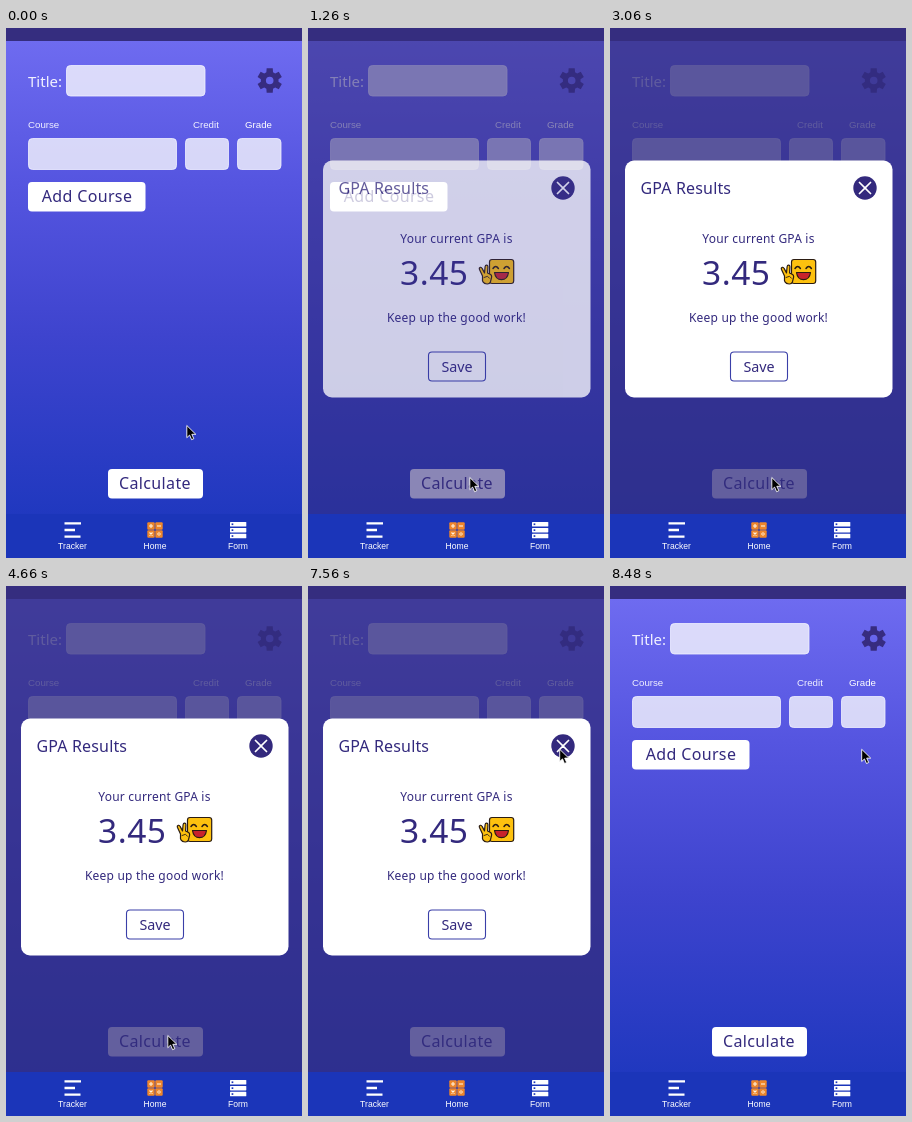
Write an HTML page that moves like this. It is 296x530 px and loops after 8.5 s.

```html
<!DOCTYPE html>
<html lang="en">
<head>
<meta charset="utf-8">
<title>GPA calculator</title>
<style>
  html, body { margin: 0; width: 100%; height: 100%; overflow: hidden; background: #1c35ba; }
  svg { display: block; width: 296px; height: 530px; }
  text { font-family: "Noto Sans", "Open Sans", sans-serif; fill: #33297d; }
  .mid { text-anchor: middle; }
  .light { fill: #f1f1ff; }
  .label { font: 9.7px "Liberation Sans", Arial, sans-serif; }
  .tab { font: 8.6px "Liberation Sans", Arial, sans-serif; text-anchor: middle; fill: #fff; }
  .field { fill: #fff; fill-opacity: .76; stroke: #f0f0ff; stroke-opacity: .8; }
  .button { font-size: 16px; letter-spacing: .35px; }
  .note { font-size: 12px; letter-spacing: .2px; text-anchor: middle; }
</style>
</head>
<body>
<svg viewBox="0 0 296 530" xmlns="http://www.w3.org/2000/svg">
  <defs>
    <linearGradient id="sky" x1="0" y1="0" x2="0" y2="1">
      <stop offset="0" stop-color="#6e6bf0"/>
      <stop offset=".3" stop-color="#5555e0"/>
      <stop offset=".62" stop-color="#3e44ce"/>
      <stop offset="1" stop-color="#2038bf"/>
    </linearGradient>
  </defs>

  <rect y="13" width="296" height="474" fill="url(#sky)"/>

  <g id="form">
    <text x="22" y="59" font-size="15" class="light">Title:</text>
    <rect class="field" x="60.5" y="37.5" width="138.5" height="30.5" rx="4"/>
    <path id="gear" fill="#372c80" fill-rule="evenodd"/>
    <text x="22" y="99.5" class="label light">Course</text>
    <text x="187" y="99.5" class="label light">Credit</text>
    <text x="239" y="99.5" class="label" style="fill:#fff">Grade</text>
    <rect class="field" x="22.5" y="110.5" width="148" height="31" rx="4"/>
    <rect class="field" x="179.5" y="110.5" width="43" height="31" rx="4"/>
    <rect class="field" x="231.5" y="110.5" width="43.5" height="31" rx="4"/>
    <rect x="102" y="441" width="95" height="29.5" rx="4" fill="#fff"/>
    <text x="149" y="461" class="button mid">Calculate</text>
  </g>

  <rect id="shade" y="13" width="296" height="474" fill="#332d80"/>

  <rect x="22" y="154" width="117.5" height="29.5" rx="4" fill="#fff"/>
  <text x="81" y="174" class="button mid">Add Course</text>

  <g id="dialog">
    <rect x="15" y="132.5" width="267.5" height="237" rx="9" fill="#fff"/>
    <text x="30.5" y="166" font-size="16" letter-spacing=".15">GPA Results</text>
    <circle cx="255" cy="160" r="11.7" fill="#33297d"/>
    <path d="M249.5 154.5l11 11m0-11l-11 11" stroke="#fff" stroke-width="1.7" stroke-linecap="round"/>
    <text x="148.5" y="215" class="note">Your current GPA is</text>
    <text x="92" y="256.5" font-size="33.5" letter-spacing=".5">3.45</text>
    <text x="148.5" y="294" class="note">Keep up the good work!</text>
    <rect x="120.5" y="324" width="57" height="29" rx="3.5" fill="#fff" stroke="#3a3fa8" stroke-width="1.1"/>
    <text x="149" y="344" font-size="14.3" class="mid">Save</text>

    <g stroke="#2b1c12" stroke-width="1.2" stroke-linecap="round" stroke-linejoin="round">
      <rect x="181.5" y="231.5" width="24.2" height="24" rx="2.5" fill="#fdc10f"/>
      <path d="M185 240.5q2.7-4 5.4 0M196 240.5q2.7-4 5.4 0" fill="none" stroke-width="1.5"/>
      <path d="M186.5 244.5h14q-1 7.2-7 7.2t-7-7.2z" fill="#c8232c"/>
      <path d="M174.5 248l-3-6.5q-.6-1.8.8-2.2 1.2-.3 1.8 1.1l2.4 4.5.6-6.2q.2-1.6 1.5-1.5 1.4.1 1.3 1.8l-.3 6 3 1.5q1.4 1 .9 3.2l-1 4q-.7 2.3-3.2 2.3-3.8 0-4.8-3.2z" fill="#fdc10f"/>
      <path d="M176 249.5l3.5-1.2 2 2" fill="none" stroke-width=".9"/>
    </g>
  </g>

  <rect width="296" height="13" fill="#352d7f"/>
  <rect y="486" width="296" height="44" fill="#1b35b9"/>
  <path d="M58.5 495.3h16.5M58.5 502h10.5M58.5 508.7h16" stroke="#fff" stroke-width="2.3"/>
  <g id="keys"></g>
  <g id="bars"></g>
  <text x="66.5" y="521" class="tab">Tracker</text>
  <text x="149" y="521" class="tab">Home</text>
  <text x="232" y="521" class="tab">Form</text>

  <path id="cursor" d="M0 0v12.2l2.8-2.6 2 4.6 2.2-1-2-4.4h4z" fill="#000" stroke="#fff" stroke-width=".9" stroke-linejoin="round"/>
</svg>

<script>
const LOOP = 8500;
const byId = id => document.getElementById(id);
const mix = (a, b, p) => a + (b - a) * p;

function ease(t, start, length) {
  const p = Math.min(1, Math.max(0, (t - start) / length));
  return p * p * (3 - 2 * p);
}

function gearPath(cx, cy) {
  const points = [];
  for (let tooth = 0; tooth < 6; tooth++) {
    for (const [offset, radius] of [[-22, 8.9], [-14, 12.6], [14, 12.6], [22, 8.9]]) {
      const angle = (tooth * 60 - 90 + offset) * Math.PI / 180;
      points.push(`${cx + radius * Math.cos(angle)} ${cy + radius * Math.sin(angle)}`);
    }
  }
  return `M${points.join('L')}ZM${cx - 3.8} ${cy}a3.8 3.8 0 1 0 7.6 0a3.8 3.8 0 1 0 -7.6 0Z`;
}

byId('gear').setAttribute('d', gearPath(263.7, 52.5));

const signs = ['M-2 0h4M0-2v4', 'M-2 0h4', 'M-1.5-1.5l3 3m0-3l-3 3', 'M-2 0h4M0-2v.8M0 1.2v.8'];
byId('keys').innerHTML = signs.map((sign, i) => `
  <g transform="translate(${145 + i % 2 * 8} ${498 + (i >> 1) * 8})">
    <rect x="-3.7" y="-3.7" width="7.4" height="7.4" rx="1" fill="#ee862b"/>
    <path d="${sign}" stroke="#fff3df" stroke-width="1.1"/>
  </g>`).join('');

byId('bars').innerHTML = [494, 499.9, 505.8].map(y => `
  <rect x="224" y="${y}" width="16.3" height="4.5" rx=".6" fill="#fff"/>
  <rect x="225.6" y="${y + 1.4}" width="1.7" height="1.7" fill="#1b35b9"/>`).join('');

const stops = [[180.8, 397.5], [161.8, 449.5], [251.7, 163.3]];

function draw(t) {
  const toCalculate = ease(t, 200, 640);
  const toClose = ease(t, 5640, 610);
  const [x, y] = [0, 1].map(k =>
    mix(mix(stops[0][k], stops[1][k], toCalculate), stops[2][k], toClose));
  byId('cursor').setAttribute('transform', `translate(${x} ${y})`);

  const shown = ease(t, 990, 400) - ease(t, 7760, 400);
  byId('dialog').setAttribute('opacity', shown);
  byId('shade').setAttribute('opacity', shown * .76);
}

const began = performance.now();
function tick() {
  draw((performance.now() - began) % LOOP);
  requestAnimationFrame(tick);
}
tick();
</script>
</body>
</html>
```
